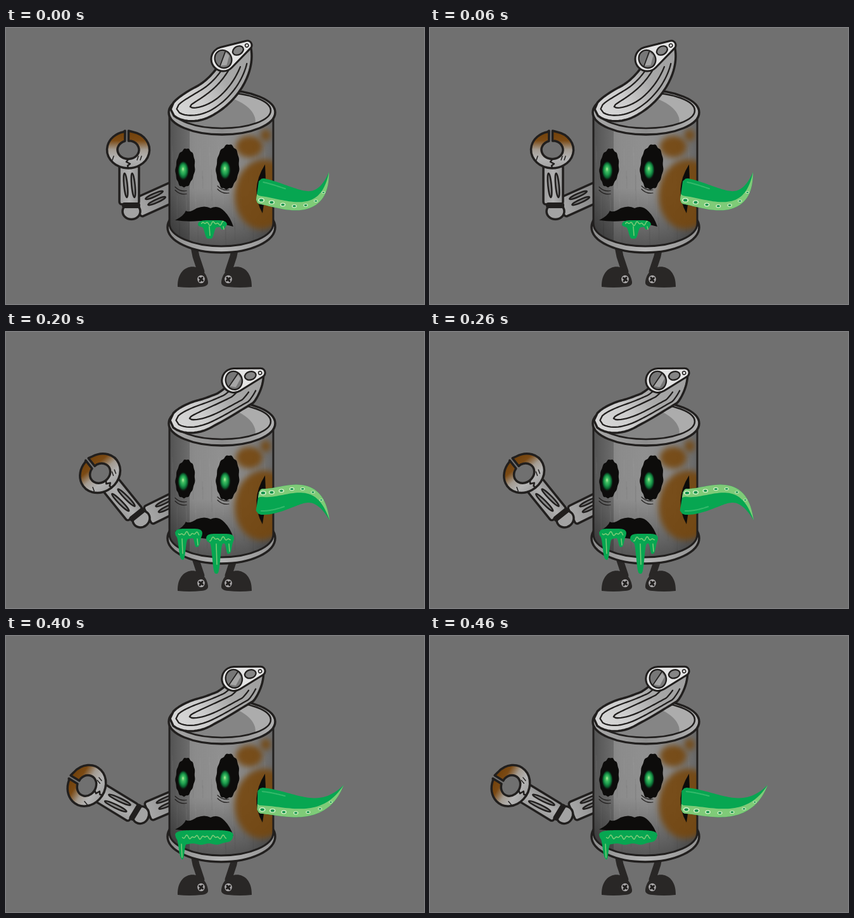
An HTML page with a canvas for the animation above (500 ms loop, 660 px wide and 435 px high).

```html
<!DOCTYPE html>
<html lang="en">
<head>
<meta charset="utf-8">
<title>Tin can monster</title>
<style>
  html, body { margin: 0; width: 100%; height: 100%; overflow: hidden; background: #707070; }
  canvas { display: block; }
</style>
</head>
<body>
<canvas id="stage" width="660" height="435"></canvas>
<script>
const ctx = document.getElementById('stage').getContext('2d');
const INK = '#211f1e', BLACK = '#0d0c0b', GREEN = '#07a651', LIME = '#7fcb78', RUST = '#76480f';

// One pose per 100 ms. reach: tentacle curve, drool: [left, right, top, thickness, ...drips as [x, length, radius]]
const poses = [
  { drop: 0, lid: 0, elbow: [197, 291], fore: 0, side: 1, reach: [[397, 256], [440, 262], [495, 300], [510, 227]],
    drool: [[303, 349, 303, 10, [321, 20, 8], [343, 6, 4]]] },
  { drop: 5, lid: 5, elbow: [208, 292], fore: -22.7, side: 1, reach: [[397, 261], [440, 250], [508, 292], [503, 321]],
    drool: [[267, 310, 304, 16, [278, 31, 6], [302, 14, 5]], [316, 360, 311, 16, [332, 45, 7], [352, 17, 5]]] },
  { drop: 11, lid: 14, elbow: [214, 297], fore: -39, side: -1, reach: [[397, 267], [440, 274], [485, 222], [511, 297]],
    drool: [[267, 310, 310, 16, [278, 33, 6], [302, 14, 5]], [316, 360, 318, 16, [332, 46, 7], [352, 17, 5]]] },
  { drop: 6, lid: 26, elbow: [213, 290], fore: -75, side: 1, reach: [[397, 262], [440, 264], [495, 296], [533, 239]],
    drool: [[271, 316, 303, 18, [288, 44, 8], [306, 13, 5]], [320, 361, 311, 16, [342, 34, 7], [355, 12, 4]]] },
  { drop: 2, lid: 14, elbow: [214, 284], fore: -58.6, side: 1, reach: [[397, 259], [440, 260], [495, 293], [533, 235]],
    drool: [[267, 359, 306, 22, [277, 30, 5]]] }
];

const clamp = v => Math.max(0, Math.min(1, v));
const rad = degrees => degrees * Math.PI / 180;
const roundEnd = u => Math.sqrt(1 - (1 - clamp(u)) ** 2);

function paint(path, fill, line, width = 3) {
  if (fill) { ctx.fillStyle = fill; ctx.fill(path); }
  if (line) { ctx.strokeStyle = line; ctx.lineWidth = width; ctx.stroke(path); }
}
const shape = (d, ...style) => paint(new Path2D(d), ...style);
const polygon = (pts, ...style) => shape('M' + pts.join('L') + 'Z', ...style);
const polyline = (pts, line, width) => shape('M' + pts.join('L'), null, line, width);

function oval(x, y, rx, ry, fill, line, width, tilt = 0) {
  const path = new Path2D();
  path.ellipse(x, y, rx, ry, tilt, 0, 7);
  paint(path, fill, line, width);
}

function bar(x, y, w, h, r, ...style) {
  const path = new Path2D();
  path.roundRect(x, y, w, h, r);
  paint(path, ...style);
}

function gradient(x0, y0, x1, y1, ...colors) {
  const g = ctx.createLinearGradient(x0, y0, x1, y1);
  colors.forEach((c, i) => g.addColorStop(i / (colors.length - 1), c));
  return g;
}

function within(setup, draw) {
  ctx.save();
  setup();
  draw();
  ctx.restore();
}

// Points beside a cubic curve, at a distance given by offset(t)
function edge([a, b, c, d], offset, from = 0, to = 1) {
  return Array.from({ length: 41 }, (_, i) => {
    const t = from + (to - from) * i / 40, s = 1 - t;
    const pos = j => s ** 3 * a[j] + 3 * s * s * t * b[j] + 3 * s * t * t * c[j] + t ** 3 * d[j];
    const vel = j => s * s * (b[j] - a[j]) + 2 * s * t * (c[j] - b[j]) + t * t * (d[j] - c[j]);
    const k = offset(t) / Math.hypot(vel(0), vel(1));
    return [pos(0) - vel(1) * k, pos(1) + vel(0) * k];
  });
}

function leg() {
  polyline([[296, 340], [300, 360], [308, 384]], '#292726', 11);
  shape('M271 408 C270 366 315 368 319 400 Q320 407 308 408 Q290 410 271 408', '#292726');
  oval(308, 396, 5.8, 6.3, '#aaa8a9');
  polyline([[305.5, 394], [310.5, 398]], INK, 3);
  polyline([[310, 393.5], [306, 399]], INK, 3);
}

function claw() {
  const path = new Path2D();
  path.ellipse(193, 192, 33.5, 29, 0, -1.35, 4.49);
  path.lineTo(188, 162);
  path.ellipse(193, 192, 17, 14.5, 0, 4.4, -1.3, true);
  path.lineTo(193.5, 178);
  path.lineTo(193.5, 162);
  path.closePath();
  paint(path, gradient(0, 163, 0, 220, '#70400a', '#7b4a14', '#a39b91', '#b4b4b4', '#a2a2a2'), INK, 3.5);
  polyline([[193, 207], [190, 211], [196, 214], [192, 217], [193, 221]], INK, 2.5);
  for (const x of [168, 207, 212]) polyline([[x, 208], [x + 2, 202]], INK, 1.5);
}

function arm({ elbow: [x, y], drop, fore }) {
  within(() => { ctx.translate(x, y); ctx.rotate(Math.atan2(256 + drop - y, 275 - x)); }, () => {
    bar(12, -18, 70, 31, 4, gradient(10, 0, 66, 0, '#a9a9a9', '#888'), INK, 3.5);
    for (const dy of [-10, 0]) oval(45, dy, 15, 2.5, '#777', INK, 2.5);
  });
  within(() => { ctx.translate(x, y); ctx.rotate(rad(fore)); ctx.translate(-197, -291); }, () => {
    oval(198, 289, 14, 12.5, '#a3a3a3', INK, 3.5);
    bar(179, 216, 31, 62, 4, gradient(178, 0, 211, 0, '#9b9b9b', '#b1b1b1', '#929292'), INK, 3.5);
    bar(183, 275, 29, 9, 4, INK);
    for (const cx of [189, 201]) oval(cx, 248, 2.7, 19, '#888', INK, 2.5, -.1);
    claw();
  });
}

function can() {
  oval(340, 314, 85, 40, gradient(255, 0, 425, 0, '#8b8b8b', '#b5b5b5', '#929292'), INK, 3.5);
  const side = new Path2D('M258 128 L258 308 A82 36 0 0 0 422 308 L422 128 Z');
  paint(side, gradient(258, 0, 422, 0, '#7c7c7c', '#8b8b8b', '#909090', '#868686', '#666'));
  within(() => ctx.clip(side), () => {
    bar(258, 128, 32, 220, 0, gradient(258, 0, 290, 0, '#0005', '#0003'));
    paint(side, gradient(0, 160, 0, 345, '#0000', '#0000', '#0006'));
    for (let i = 0; i < 60; i++) {
      const x = 260 + i * 61.8 % 160, y = 160 + i * 37.3 % 150;
      polyline([[x, y], [x, y + 12 + i % 5 * 7]], i % 2 ? '#ffffff0c' : '#0000000f', 1);
    }
    within(() => { ctx.filter = 'blur(5px)'; ctx.globalAlpha = .9; }, () => {
      oval(384, 187, 21, 17, RUST);
      oval(410, 169, 8, 9, RUST);
      oval(405, 262, 44, 55, RUST, null, 0, .1);
    });
  });
  paint(side, null, INK, 3);
}

function eye(x, y, rx, ry, px, py) {
  const rim = Array.from({ length: 72 }, (_, i) => {
    const a = i * Math.PI / 36, r = .98 + .025 * Math.sin(13 * a) + .015 * Math.sin(7 * a);
    return [x + Math.cos(a) * rx * r - Math.sin(a) * 2, y + Math.sin(a) * ry * r];
  });
  polygon(rim, BLACK);
  within(() => { ctx.translate(px, py); ctx.scale(.58, 1); }, () => {
    const glow = ctx.createRadialGradient(-1, -3, 0, 0, 0, 16);
    ['#b4ef9f', '#42bd62', '#1c9c4d', '#0a582b', '#0d0c0b00'].forEach((c, i) => glow.addColorStop(i / 4, c));
    oval(0, 0, 16, 16, glow);
  });
  for (const dy of [0, 5]) shape(`M${x - 16} ${y + 30 + dy} q8 8 18 6`, null, INK, 1.2);
}

function face(open) {
  eye(283, 220.5, 15.5, 31, 280, 225);
  eye(350, 219, 18.5, 36, 346, 224);
  shape('M409 215 Q412 255 405 292 Q384 255 409 215', BLACK);
  shape('M267 303 Q281 296 284 288 Q289 292 301 284 Q314 279 323 284 Q335 278 345 289 Q354 298 359 313 '
    + (open ? 'Q320 322 267 303' : 'Q325 305 305 304 Q288 306 267 303'), BLACK);
}

function drool([left, right, top, thick, ...drips]) {
  const mid = (left + right) / 2, half = (right - left) / 2;
  const xs = Array.from({ length: 81 }, (_, i) => left + half * i / 40);
  const round = x => Math.sqrt(Math.max(0, 1 - Math.abs((x - mid) / half) ** 5));
  const hang = x => drips.reduce((sum, [c, len, r]) => sum + len * Math.exp(-(((x - c) / r) ** 4)), 0);
  const upper = xs.map(x => [x, top + 7 - 7 * round(x)]);
  const lower = xs.map(x => [x, top + 7 + (thick - 7 + hang(x) + Math.sin(x / 4)) * round(x)]);
  polygon([...upper, ...lower.reverse()], GREEN);
  polyline(xs.slice(10, 71).map(x => [x, top + thick * .5 + 3.5 * Math.sin(x * .6) * Math.sin(x * .17)]), LIME, 1.5);
  for (const [x, len] of drips) polyline([[x, top + thick], [x + 1, top + thick + len * .7]], LIME, 1.5);
}

function tentacle({ reach, side }) {
  const half = t => 20.5 * (1 - t ** 2.2) * roundEnd(.3 + t / .07);
  const band = t => side * (.4 - .4 * t);
  const strip = (a, b) => [...edge(reach, t => half(t) * a(t)), ...edge(reach, t => half(t) * b(t)).reverse()];
  polygon(strip(() => -1, () => 1), GREEN);
  polygon(strip(band, () => side), LIME);
  polyline(edge(reach, t => -side * half(t) * .7, .05, .3), '#35b96b', 2);
  edge(reach, t => half(t) * (band(t) + side) / 2, .07, .9).filter((_, i) => i % 6 === 0).forEach(([x, y], i) => {
    oval(x, y, 5 - i * .35, 3.6 - i * .3, '#d3efc6');
    oval(x, y, 3.2 - i * .2, 2.2 - i * .2, '#12934c');
  });
}

function rim() {
  oval(341, 133, 84, 35, gradient(257, 0, 425, 0, '#a9a9a9', '#8d8d8d', '#b1b1b1'), INK, 3.5);
  const inside = new Path2D();
  inside.ellipse(341, 130, 77, 28, 0, 0, 7);
  paint(inside, '#acacac');
  within(() => ctx.clip(inside), () => oval(326, 142, 68, 37, '#858585', null, 0, .1));
  paint(inside, null, INK, 2.5);
}

function tab() {
  const hull = new Path2D(), tangent = Math.acos(12 / 44);
  hull.arc(0, 0, 19, tangent, -tangent);
  hull.arc(44, 0, 7, -tangent, tangent);
  hull.closePath();
  paint(hull, '#e4e4e4', INK, 3);
  oval(0, 0, 13, 14.5, '#777', INK, 2.3);
  polygon([[-9, 7], [9, -7], [11, 0], [0, 11]], '#a5a5a5');
  polyline([[-10, 7], [9, -9]], INK, 1.6);
  oval(27, 0, 9, 6.5, '#858585', INK, 2.3);
  oval(43, 0, 2.6, 2.6, '#eee', INK, 1.5);
}

// The lid curls: the farther a point is from the hinge, the more of the angle it takes
function lid(angle) {
  const spine = [[260, 128], [325, 128], [362, 80], [374, 28]], sag = angle ** 2 / 170;
  const curl = ([x, y]) => {
    const a = rad(angle) * clamp((135 - y) / 60), dx = x - 290, dy = y - 130;
    return [290 + dx * Math.cos(a) - dy * Math.sin(a), 130 + dx * Math.sin(a) + dy * Math.cos(a)];
  };
  const ring = (scale, from, to) => {
    const half = t => 26 * scale * roundEnd((t - from) / .3) * (1 - .5 * t ** 6);
    return [...edge(spine, t => -half(t), from, to).reverse(), ...edge(spine, half, from, to)].map(curl);
  };
  within(() => ctx.translate(-sag, sag), () => {
    polygon(ring(1, 0, 1), gradient(265, 140, 390, 60, '#d8d8d8', '#cecece', '#a9a9a9', '#a0a0a0'), INK, 3.5);
    polyline(ring(.68, .05, .85), INK, 2.3);
    polyline(ring(.3, .17, .8), INK, 2.3);
    ctx.translate(290, 130);
    ctx.rotate(rad(angle));
    ctx.translate(53, -81);
    ctx.rotate(rad(-30));
    tab();
  });
}

function draw() {
  const step = Math.floor(performance.now() / 100) % poses.length, pose = poses[step];
  const shift = () => ctx.translate(0, pose.drop);
  ctx.fillStyle = '#707070';
  ctx.fillRect(0, 0, 660, 435);
  leg();
  within(() => { ctx.translate(659, 0); ctx.scale(-1, 1); }, leg);
  arm(pose);
  within(shift, () => {
    can();
    face(pose.drop > 2);
  });
  pose.drool.forEach(drool);
  tentacle(pose);
  within(shift, () => {
    rim();
    lid(pose.lid);
  });
  requestAnimationFrame(draw);
}

ctx.lineJoin = ctx.lineCap = 'round';
draw();
</script>
</body>
</html>
```
